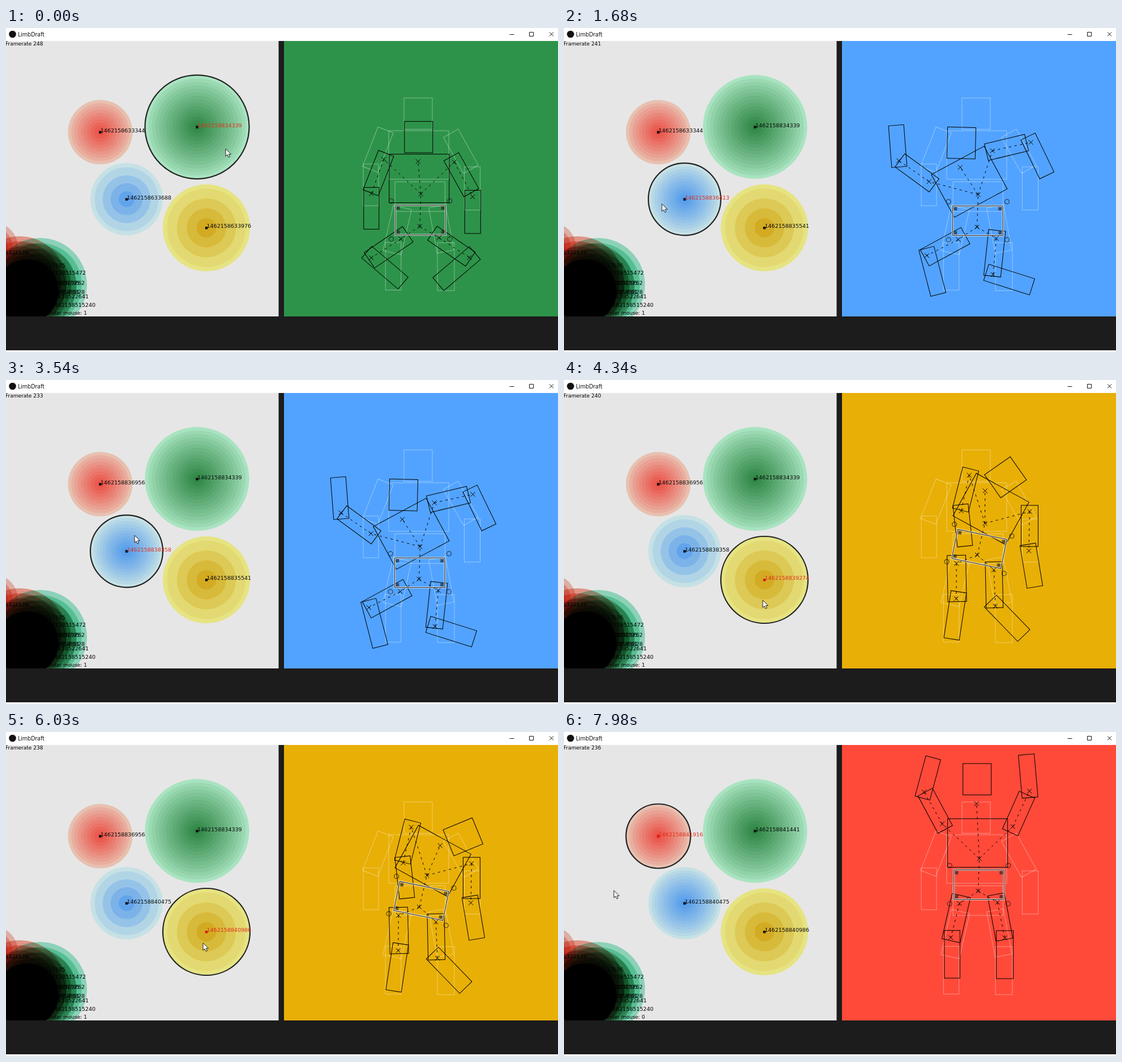
Animation of 975 by 574 pixels, one loop 8 s. Source, as an HTML page:

```html
<!DOCTYPE html>
<html lang="en">
<head>
<meta charset="utf-8">
<title>LimbDraft</title>
<style>
  html, body { margin: 0; width: 100%; height: 100%; overflow: hidden; background: #fff; }
  svg { display: block; width: 975px; height: 574px; }
  text { font-family: "DejaVu Sans", sans-serif; font-size: 9.5px; }
  .small { font-size: 9px; }
  .title { font: 10px "Open Sans", sans-serif; }
  .ghost { fill: none; stroke: #fff; stroke-opacity: .38; }
  .ink { fill: none; stroke: #000; }
  #pile { isolation: isolate; }
  #pile circle { mix-blend-mode: multiply; }
</style>
</head>
<body>
<svg viewBox="0 0 975 574">
  <defs><clipPath id="left"><rect y="23" width="481.5" height="488"/></clipPath></defs>
  <rect width="975" height="574" fill="#fff"/>
  <rect y="23" width="975" height="548" fill="#1c1c1c"/>
  <circle cx="11.5" cy="11" r="6.3" fill="#111"/>
  <text class="title" x="21" y="15">LimbDraft</text>
  <path d="M889.5 11.5h8M924.5 7.5h7v7h-7zM960 7.5l7 7m0-7l-7 7" fill="none" stroke="#111"/>
  <g clip-path="url(#left)">
    <g id="pile"></g>
    <g id="zones"></g>
    <text id="rate" class="small" x="-1" y="31"></text>
    <text id="count" class="small" x="143" y="508" text-anchor="end"></text>
  </g>
  <rect id="panel" x="491" y="23" width="484" height="488"/>
  <g id="ghost" class="ghost"></g>
  <g id="figure"></g>
  <path id="cursor" d="M0 0V14L3.2 11L5.5 16L8 15L5.7 10.2H10.2Z" fill="#fff" stroke="#111"/>
</svg>
<script>
const LOOP = 8000, CLOCK = 1462158835050;
const $ = id => document.getElementById(id);
const mix = (a, b, k) => a + (b - a) * k;
const range = n => Array.from({ length: n }, (_, i) => i);

const ZONES = {
  red:    { x: 166.5, y: 184.5, r: 57, rings: 10, out: [232, 192, 176], mid: [235, 72, 62], bg: "#ff4a3a", dot: "#d11" },
  green:  { x: 337.5, y: 175.3, r: 92, rings: 15, out: [168, 227, 192], mid: [40, 130, 62], bg: "#2e934a" },
  blue:   { x: 213, y: 303.3, r: 64, rings: 12, out: [198, 225, 229], mid: [75, 150, 236], bg: "#52a3ff" },
  yellow: { x: 354, y: 354, r: 77, out: [230, 227, 130], mid: [207, 158, 12], bg: "#e8af06", dot: "#d11" }
};

// Each label is the clock reading of the latest visit.
const VISITS = [
  [-201706, "red"], [-201362, "blue"], [-201074, "yellow"], [-711, "green"],
  [491, "yellow"], [1363, "blue"], [1906, "red"], [2450, ""],
  [3308, "blue"], [3780, ""], [4224, "yellow"], [4690, ""],
  [5425, "blue"], [5936, "yellow"], [6391, "green"], [6866, "red"]
];

const MOUSE = [
  [0, 388, 214], [491, 386, 284], [1000, 320, 345], [1680, 173, 312], [1906, 168, 240],
  [2200, 150, 192], [2790, 69, 251], [3308, 150, 297], [3540, 227, 275], [4000, 268, 378],
  [4340, 351, 390], [4800, 360, 436], [5425, 240, 361], [5700, 245, 312], [6030, 348, 374],
  [6391, 362, 263], [6866, 222, 181], [7150, 165, 190], [7630, 90, 294], [8000, 88, 280]
];
const RATE = [[0, 248], [1680, 241], [2790, 226], [3540, 233], [4340, 240], [8000, 236]];

// Joint x y, box w h, tilt; the box centre hangs a share of its height below the joint.
const part = (parent, x, y, w, h, tilt = 0, hang = .35, dx = 0) => ({ parent, x, y, w, h, tilt, hang, dx });
const RIG = {
  pelvis: part("", 730, 310, 88.5, 52.5, 0, -.215, 1.3),
  chest:  part("pelvis", 732, 252.5, 106, 86, 0, -.32, -3),
  neck:   part("chest", 727, 195, 50, 55.5, 0, -.78, 1),
  armL:   part("chest", 666.5, 191, 29, 75, 21.3),
  foreL:  part("armL", 644.5, 252, 27, 74),
  armR:   part("chest", 791, 196, 30, 73, -29),
  foreR:  part("armR", 823.5, 257.5, 28, 76.5),
  legL:   part("pelvis", 697, 332, 33, 82, 12.8, .325),
  shinL:  part("legL", 681.5, 392.5, 27.5, 84.5, 0, .35, 2.5),
  legR:   part("pelvis", 764, 330, 30, 81.5, -10.5, .325),
  shinR:  part("legR", 777, 393, 30, 85)
};

// Shift of the root, then turns; parts not named follow at rest.
const POSES = {
  "":     { dx: 0, dy: 0 },
  green:  { dx: .8, dy: 41.5, legL: 43, shinL: -49.5, legR: -45, shinR: 49.5 },
  red:    { dx: 1.6, dy: -28.3, rise: 39.7, armL: 130.5, foreL: 195, armR: -127, foreR: 175 },
  blue:   { dx: -.5, dy: 42.7, chest: -28.3, neck: 1.4, armL: 105, foreL: 175.6, armR: -74.5, foreR: -25.8,
            legL: 48.6, shinL: -14.4, legR: 16.6, shinR: -72.5 },
  yellow: { dx: 0, dy: 0, pelvis: 11.6, chest: 28.8, neck: 55, armL: -7.2, foreL: -6.2, armR: 29, foreR: -9.4,
            legL: -14, shinL: 8.6, legR: 9.3, shinR: -44, nod: 12.6 }
};

function sample(keys, t) {
  const i = Math.max(1, keys.findIndex(k => k[0] > t));
  const a = keys[i - 1], b = keys[i], k = (t - a[0]) / (b[0] - a[0]);
  return a.slice(1).map((v, j) => mix(v, b[j + 1], k));
}

function turned(x, y, deg) {
  const a = deg * Math.PI / 180, c = Math.cos(a), s = Math.sin(a);
  return [x * c - y * s, x * s + y * c];
}

function poseAt(name, t) {
  const pose = POSES[name], joints = {};
  const sway = pose.nod ? .5 - .5 * Math.cos(2 * Math.PI * (t - 4340) / 1127) : 1;
  for (const [id, p] of Object.entries(RIG)) {
    let turn = pose[id] || 0;
    if (!p.parent) {
      joints[id] = { x: p.x + pose.dx, y: p.y + pose.dy, turn };
      continue;
    }
    const up = RIG[p.parent], base = joints[p.parent], head = id === "neck";
    if (head) turn += (pose.nod || 0) * sway;
    const swing = head ? base.turn * mix(.18, 1, sway) : base.turn;
    const [x, y] = turned(p.x - up.x, p.y - up.y - (head && pose.rise || 0), swing);
    joints[id] = { x: base.x + x, y: base.y + y, turn };
  }
  return joints;
}

const box = (w, h, extra = "") => `<rect x="${-w / 2}" y="${-h / 2}" width="${w}" height="${h}" ${extra}/>`;

function place(id, { x, y, turn }, inner) {
  const p = RIG[id];
  return `<g transform="translate(${x} ${y}) rotate(${turn}) translate(${p.dx}) rotate(${p.tilt}) translate(0 ${p.hang * p.h})">${inner}</g>`;
}

const boxes = (joints, skip) => Object.keys(RIG).filter(id => id !== skip)
  .map(id => place(id, joints[id], box(RIG[id].w, RIG[id].h))).join("");

function selection({ w, h }) {
  let s = box(w, h, 'fill="none" stroke="#fff" stroke-width="3" opacity=".85"') + box(w, h, 'class="ink"');
  for (const i of [-1, 1]) for (const j of [-1, 1])
    s += `<rect x="${i * 39.5 - 3}" y="${j * 21.3 - 3}" width="6" height="6" fill="#222" opacity=".65"/>` +
         `<circle cx="${i * 51.7}" cy="${j * 33.8}" r="4" fill="none" stroke="#111" stroke-width="1.3" opacity=".65"/>`;
  return s;
}

function figure(joints) {
  let bones = "", marks = "";
  for (const [id, { x, y }] of Object.entries(joints)) {
    const base = joints[RIG[id].parent];
    if (base) bones += `M${base.x},${base.y}L${x},${y}`;
    marks += `M${x - 4},${y - 4}l8 8m0-8l-8 8`;
  }
  return `<g class="ink">${boxes(joints, "pelvis")}</g>` + place("pelvis", joints.pelvis, selection(RIG.pelvis)) +
    `<path class="ink" d="${bones}" stroke-dasharray="4 6"/><path class="ink" d="${marks}"/>`;
}

const even = (r, n) => range(n).map(i => r * (1 - i / n));

function radii(id, active) {
  const { r, rings } = ZONES[id];
  const coarse = !rings || id === "blue" && active !== "blue" && active !== "red";
  return coarse ? [r, ...even(r - 7.5, 4)] : even(r, rings);
}

function zones(active, stamps) {
  let discs = "", labels = "";
  for (const [id, z] of Object.entries(ZONES)) {
    const on = id === active;
    for (const r of radii(id, active)) {
      const k = (1 - r / z.r) ** .85;
      const rgb = z.out.map((c, i) => Math.round(mix(c, z.mid[i], k)));
      discs += `<circle cx="${z.x}" cy="${z.y}" r="${r}" fill="rgb(${rgb})"/>`;
    }
    if (on) discs += `<circle cx="${z.x}" cy="${z.y}" r="${z.r}" fill="none" stroke="#222" stroke-width="2.2"/>`;
    labels += `<rect x="${z.x - 2.2}" y="${z.y - 2}" width="4.4" height="4.4" fill="${on && z.dot || "#0a0a0a"}"/>` +
      `<text x="${z.x + .5}" y="${z.y + .4}" fill="${on ? "#e0301c" : "#0a0a0a"}">${stamps[id]}</text>`;
  }
  return discs + labels;
}

// Old zones heaped in the corner: multiplied rings darken to black.
function pile() {
  const heap = (x, y, r, tint, n) => range(n)
    .map(i => `<circle cx="${x}" cy="${y}" r="${r - i * 9}" fill="${tint}"/>`).join("");
  const note = (end, y, n) => `<text x="${end}" y="${y}" text-anchor="end">1462158${n}</text>`;
  return '<rect y="23" width="482" height="488" fill="#e6e6e6"/>' +
    heap(-22, 388, 43, "#f5c0b5", 3) + heap(24, 452, 83, "#f7a596", 5) + heap(60, 455, 83, "#9be8cc", 5) +
    heap(48, 458, 76, "#c4bcac", 5) + heap(4, 500, 66, "#90b8e8", 3) + heap(37, 466, 56, "#000", 1) +
    note(40, 401, 322179) + note(105, 424, 323505) + note(141, 437, 515472) +
    range(4).map(i => note(139 - i % 2 * 9, 455 + (i >> 1) * 15.5, 511762 + i * 17033)).join("") +
    note(146, 478.5, 522641) + note(158, 494, 515240);
}

$("pile").innerHTML = pile();
$("ghost").innerHTML = boxes(poseAt("", 0));

let shown = 0;
function draw(t) {
  const past = VISITS.filter(v => v[0] <= t), active = past[past.length - 1][1];
  if (past.length !== shown) {
    shown = past.length;
    const stamps = {};
    for (const [at, id] of past) stamps[id] = CLOCK + at;
    $("zones").innerHTML = zones(active, stamps);
    $("panel").setAttribute("fill", active ? ZONES[active].bg : "#969696");
    $("ghost").setAttribute("visibility", active ? "visible" : "hidden");
  }
  const [x, y] = sample(MOUSE, t);
  const under = Object.values(ZONES).filter(z => Math.hypot(x - z.x, y - z.y) < z.r).length;
  $("figure").innerHTML = figure(poseAt(active, t));
  $("rate").textContent = "Framerate " + Math.round(sample(RATE, t)[0]);
  $("count").textContent = "Number of nodes under mouse: " + under;
  $("cursor").setAttribute("transform", `translate(${x} ${y}) scale(.93)`);
}

const start = performance.now();
function tick() {
  draw((performance.now() - start) % LOOP);
  requestAnimationFrame(tick);
}
tick();
</script>
</body>
</html>
```
